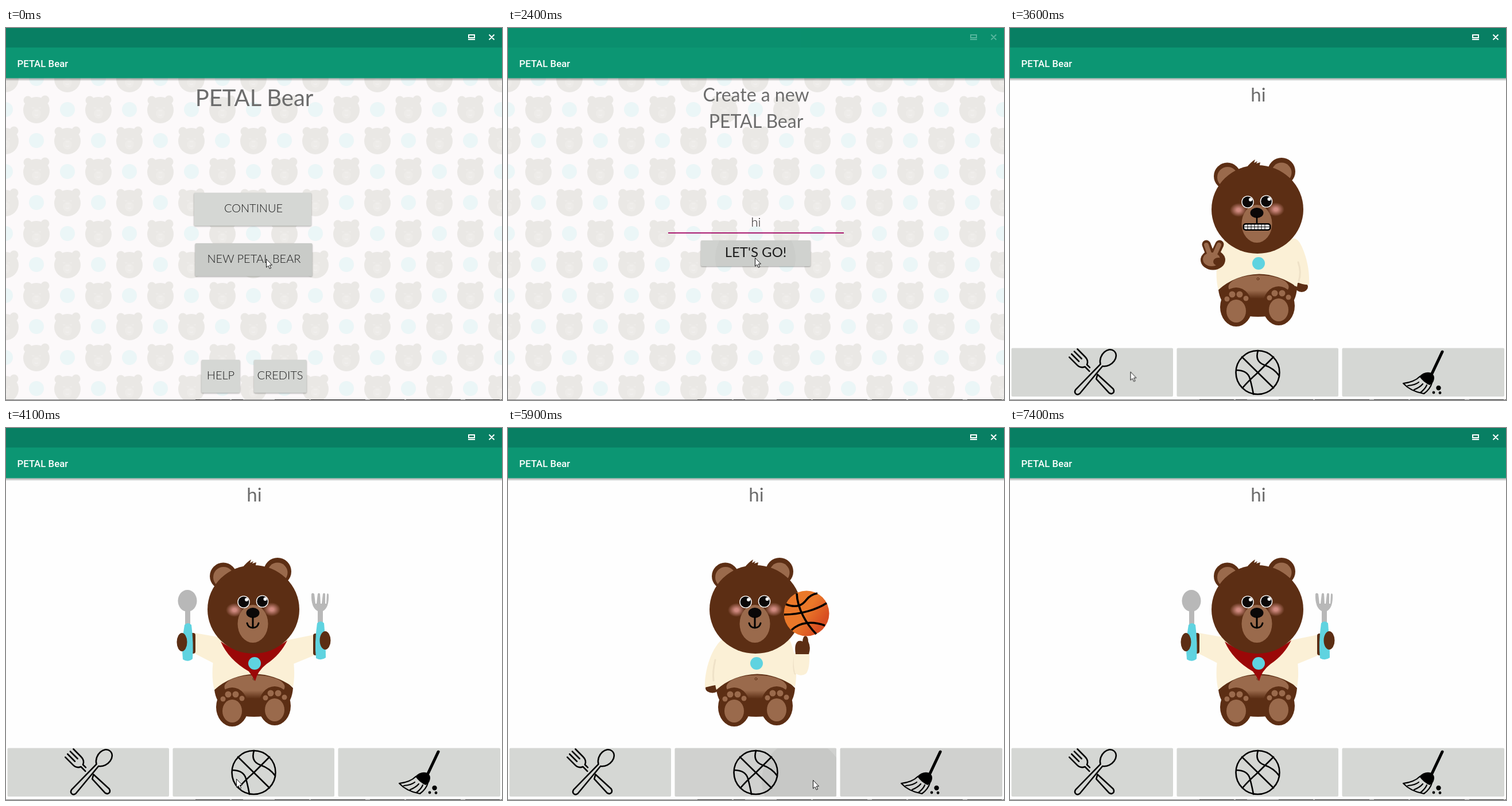
Recreate the animation shown at these times as an HTML page. Size 864 px wide and 648 px high, loop 7700 ms.

```html
<!DOCTYPE html>
<html lang="en">
<head>
<meta charset="utf-8">
<title>PETAL Bear</title>
<style>
html, body { margin: 0; width: 100%; height: 100%; overflow: hidden; background: #fff; }
svg { display: block; width: 864px; height: 648px; }
text { font-family: Lato, "Open Sans", sans-serif; text-anchor: middle; fill: #1c1c1c; }
.title { fill: #6c6c6c; }
.light { font-weight: 300; font-size: 22px; }
.label { font-size: 20px; font-weight: 300; }
.bar { font: 500 16.8px Roboto, sans-serif; text-anchor: start; fill: #fff; }
.btn { fill: #d5d7d4; filter: drop-shadow(0 1.5px 1px #0005); }
.flat { fill: #d5d7d4; }
.line { fill: none; stroke: #000; stroke-linecap: round; stroke-linejoin: round; }
.fur { fill: #5c2e14; }
.tan { fill: #9a6a4c; }
.cream { fill: #fbf0d6; }
.fold { fill: none; stroke: #efe2c8; stroke-width: 3; stroke-linecap: round; }
.mark { fill: #5fd3e0; }
.steel { fill: #b8b8b8; }

.a { animation: 7.7s step-end infinite; }

.cursor { animation-name: cursor; }
@keyframes cursor {
  0% { transform: translate(453px, 402px); }
  2.59% { transform: translate(441px, 401px); }
  5.19% { transform: translate(430px, 400px); }
  37.66% { transform: translate(422px, 408px); }
  38.96% { transform: translate(384px, 446px); }
  40.25% { transform: translate(318px, 508px); }
  41.55% { transform: translate(256px, 562px); }
  42.85% { transform: translate(222px, 590px); }
  44.15% { transform: translate(209.5px, 598.5px); }
  51.94% { transform: translate(330px, 605px); }
  53.24% { transform: translate(401px, 611px); }
  59.74% { transform: translate(414px, 614px); }
  62.33% { transform: translate(613px, 615px); }
  63.63% { transform: translate(646px, 616px); }
  64.93% { transform: translate(659px, 616px); }
  71.42% { transform: translate(585px, 615px); }
  72.72% { transform: translate(531px, 613px); }
  79.22% { transform: translate(478px, 610px); }
  80.51% { transform: translate(380px, 605px); }
  81.81% { transform: translate(281px, 600px); }
  83.11% { transform: translate(229px, 597px); }
  88.31% { transform: translate(219px, 545px); }
  89.61% { transform: translate(192px, 430px); }
  90.9% { transform: translate(156px, 284px); }
  92.2% { transform: translate(121px, 166px); }
  94.8%, to { transform: translate(-40px, 166px); }
}

.chrome { animation-name: chrome; }
@keyframes chrome {
  0% { opacity: 1; }
  7.79% { opacity: .3; }
  10.38% { opacity: .65; }
  11.68% { opacity: 1; }
  29.87% { opacity: .6; }
  31.16% { opacity: .3; }
  40.25% { opacity: .5; }
  41.55% { opacity: .7; }
  42.85% { opacity: .9; }
  44.15%, to { opacity: 1; }
}

.create { animation-name: create; }
@keyframes create {
  0% { opacity: 0; }
  9.09% { opacity: .4; transform: translateY(24px); }
  10.38% { opacity: .85; transform: translateY(6px); }
  11.68%, to { opacity: 1; transform: none; }
}

.play-screen { animation-name: play-screen; }
@keyframes play-screen {
  0% { opacity: 0; }
  37.66% { opacity: .12; transform: translateY(40px); }
  38.96% { opacity: .35; transform: translateY(24px); }
  40.25% { opacity: .6; transform: translateY(13px); }
  41.55% { opacity: .8; transform: translateY(6px); }
  42.85% { opacity: .95; transform: translateY(2px); }
  44.15%, to { opacity: 1; transform: none; }
}

.hint { animation-name: hint; }
@keyframes hint { 0% { opacity: 1; } 19.48%, to { opacity: 0; } }
.one { animation-name: one; }
@keyframes one { 0% { opacity: 0; } 19.48% { opacity: 1; } 22.07%, to { opacity: 0; } }
.two { animation-name: two; }
@keyframes two { 0% { opacity: 0; } 22.07%, to { opacity: 1; } }
.caret { animation-name: caret; }
@keyframes caret {
  0% { transform: none; }
  19.48% { transform: translateX(7px); }
  22.07% { transform: translateX(10px); opacity: 1; }
  29.87%, to { opacity: 0; }
}

.tap-new { animation-name: tap-new; }
@keyframes tap-new { 0% { opacity: 0; } 7.79%, to { opacity: .04; } }
.tap-go { animation-name: tap-go; }
@keyframes tap-go {
  0% { opacity: 0; transform: scale(.5); }
  29.87% { opacity: .03; transform: scale(.55); }
  31.16%, to { opacity: .03; transform: none; }
}
.held { animation-name: held; }
@keyframes held { 0% { opacity: 0; } 29.87%, to { opacity: .02; } }

.tap-eat { animation-name: tap-eat; }
@keyframes tap-eat {
  0% { opacity: 0; }
  49.35% { opacity: .04; }
  51.94% { opacity: 0; }
  84.41% { opacity: .04; transform: translate(20px, -2px); }
  88.31%, to { opacity: 0; }
}
.dim-ball { animation-name: dim-ball; }
@keyframes dim-ball {
  0% { opacity: 0; }
  55.84% { opacity: .03; }
  57.14% { opacity: .057; }
  71.42% { opacity: .02; }
  81.81%, to { opacity: 0; }
}
.tap-ball { animation-name: tap-ball; }
@keyframes tap-ball { 0% { opacity: 0; } 72.72% { opacity: .045; } 79.22%, to { opacity: 0; } }
.dim-broom { animation-name: dim-broom; }
@keyframes dim-broom { 0% { opacity: 0; } 62.33% { opacity: .02; } 81.81%, to { opacity: 0; } }

.peace { animation-name: peace; }
@keyframes peace { 0% { opacity: 1; } 49.35%, to { opacity: 0; } }
.smile { animation-name: smile; }
@keyframes smile { 0% { opacity: 0; } 49.35%, to { opacity: 1; } }
.eat { animation-name: eat; }
@keyframes eat {
  0% { opacity: 0; }
  49.35% { opacity: 1; }
  55.84% { opacity: 0; }
  84.41%, to { opacity: 1; }
}
.spin { animation-name: spin; }
@keyframes spin { 0% { opacity: 0; } 55.84% { opacity: 1; } 84.41%, to { opacity: 0; } }
.seams { transform-origin: 520px 323px; animation-name: seams; }
@keyframes seams {
  0% { transform: none; }
  67.53% { transform: rotate(90deg); }
  76.62%, to { transform: none; }
}
</style>
</head>
<body>
<svg viewBox="0 0 864 648">
  <defs>
    <g id="stamp">
      <g fill="#eae8e5"><circle cy="1" r="23"/><circle cx="-15" cy="-16" r="7.5"/><circle cx="15" cy="-17" r="7.5"/></g>
      <ellipse cy="7" rx="8" ry="9" fill="#edebe8"/>
      <path d="M-8-3h4M4-3h4M-3 2h6M-3 9Q0 12 3 9" fill="none" stroke="#f3f1f0" stroke-width="1.2"/>
    </g>
    <pattern id="paper" width="108" height="108" patternUnits="userSpaceOnUse" patternTransform="translate(26 115)">
      <rect width="108" height="108" fill="#fcf9fa"/>
      <use href="#stamp" x="27" y="27"/><use href="#stamp" x="81" y="81"/>
      <g fill="#ebf6f7"><circle cx="81" cy="27" r="13"/><circle cx="27" cy="81" r="13"/></g>
    </pattern>
    <linearGradient id="shade" x2="0" y2="1"><stop stop-opacity=".35"/><stop offset="1" stop-opacity="0"/></linearGradient>
    <radialGradient id="blush"><stop offset=".2" stop-color="#d08a80"/><stop offset="1" stop-color="#d08a80" stop-opacity="0"/></radialGradient>
    <linearGradient id="orange" x2="1" y2=".7"><stop offset=".55" stop-color="#ea7829"/><stop offset=".9" stop-color="#d84e22"/></linearGradient>
    <linearGradient id="tummy" x2="0" y2="1"><stop offset=".65" stop-color="#9a6a4c"/><stop offset="1" stop-color="#5c2e14"/></linearGradient>
    <clipPath id="new-box"><rect x="329" y="375" width="205" height="57"/></clipPath>
    <clipPath id="go-box"><rect x="336" y="370" width="191" height="46"/></clipPath>
    <clipPath id="eat-box"><rect x="3" y="558" width="281" height="84"/></clipPath>
    <clipPath id="ball-box"><rect x="291" y="558" width="281" height="84"/></clipPath>
    <g id="eye"><circle r="10.8" fill="#fff"/><circle r="9.4" fill="#0b0808"/><circle cx="5" cy="-4" r="3" fill="#fff"/></g>
    <g id="foot">
      <ellipse class="fur" rx="28" ry="34"/><ellipse class="tan" cx="0" cy="7" rx="17" ry="20"/>
      <g class="tan"><circle cx="-16" cy="-14" r="4.5"/><circle cx="-7" cy="-22" r="5.5"/><circle cx="6" cy="-22" r="5.5"/><circle cx="17" cy="-15" r="4.5"/></g>
    </g>
  </defs>

  <!-- Start menu -->
  <rect width="864" height="648" fill="url(#paper)"/>
  <text class="title" x="432.5" y="136" font-size="40">PETAL Bear</text>
  <rect class="btn" x="327.5" y="287" width="204.5" height="57.5" rx="2"/>
  <rect class="btn" x="329.5" y="375" width="204" height="57.5" rx="2" style="fill:#c9cbc8"/>
  <g clip-path="url(#new-box)"><circle class="a tap-new" cx="431" cy="402" r="75"/></g>
  <rect class="btn" x="340.5" y="578" width="67" height="57.5" rx="2"/>
  <rect class="btn" x="432" y="578" width="91.5" height="57.5" rx="2"/>
  <g class="label">
    <text x="431" y="320.500">CONTINUE</text><text x="432" y="408.500">NEW PETAL BEAR</text>
    <text x="374" y="612">HELP</text><text x="477.500" y="612">CREDITS</text>
  </g>

  <!-- Naming form -->
  <g class="a create">
    <rect y="60" width="864" height="588" fill="url(#paper)"/>
    <g font-size="32"><text class="title" x="432" y="128">Create a new</text><text class="title" x="432" y="174">PETAL Bear</text></g>
    <g class="light">
      <text class="a hint" x="432" y="346" style="fill:#999">Name your PETAL Bear</text>
      <text class="a one" x="431.5" y="346">h</text>
      <text class="a two" x="432" y="346">hi</text>
    </g>
    <rect x="279" y="356" width="306" height="2" fill="#a8186f"/>
    <rect class="a caret" x="430.5" y="323" width="2" height="32" fill="#a8186f"/>
    <rect class="btn" x="336" y="370" width="191" height="45" rx="2"/>
    <g clip-path="url(#go-box)">
      <rect class="a held" x="336" y="370" width="191" height="46"/>
      <g transform="translate(431 401)"><circle class="a tap-go" r="70"/></g>
    </g>
    <text x="431.5" y="399" font-size="24">LET'S GO!</text>
  </g>

  <!-- Bear -->
  <g class="a play-screen">
    <rect y="40" width="864" height="608" fill="#fefefe"/>
    <text class="title" x="432.5" y="128" font-size="33">hi</text>

    <g class="a peace">
      <ellipse class="fur" cx="508" cy="451" rx="11" ry="9"/>
      <path class="cream" d="M488 368Q500 362 508 380C518 402 522 425 521 447Q510 448 499 442Z"/>
    </g>
    <g class="a spin">
      <ellipse class="fur" cx="356" cy="453" rx="12" ry="8.5"/>
      <path class="cream" d="M376 366C355 380 342 422 343 452Q354 449 366 447Z"/>
    </g>
    <g class="a eat cream">
      <path d="M386 367L329 357V393L366 412Z"/><path d="M478 372L537 360V396L498 412Z"/>
    </g>
    <path class="fur" d="M363 456Q396 424 432 426Q472 424 500 453C498 482 480 503 432 503C385 503 366 482 363 456Z"/>
    <path class="cream" d="M374 368H490C501 390 505 425 500 451Q468 429 434 428.500Q392 430 363 456C357 435 358 390 374 368Z"/>
    <ellipse cx="433" cy="451" rx="52.500" ry="20.500" fill="url(#tummy)"/>
    <circle class="line" cx="432" cy="437" r="2" style="stroke:#5c2e14"/>
    <use href="#foot" x="394" y="486"/><use href="#foot" x="468" y="484"/>
    <path class="a eat" d="M374 372Q432 412 490 370Q478 395 454 411Q438 423 434 441Q430 433 423 424Q388 404 374 372Z" fill="#9b0808"/>
    <circle class="mark" cx="433" cy="410" r="11"/>

    <g class="fur"><circle cx="378.5" cy="258" r="23.5"/><circle cx="473" cy="250" r="24"/></g>
    <g class="tan"><circle cx="379" cy="260" r="18"/><circle cx="473" cy="252" r="17.5"/></g>
    <path class="fur" d="M412 243Q419 234 427 229L425 235L431 232L429 236L436 234L434 243Z"/>
    <ellipse class="fur" cx="431" cy="316" rx="80" ry="77"/>
    <g fill="url(#blush)"><ellipse cx="398" cy="317" rx="15" ry="12"/><ellipse cx="463" cy="316" rx="15" ry="12"/></g>
    <ellipse class="tan" cx="430" cy="341" rx="26.5" ry="33"/>
    <use href="#eye" x="414" y="303"/><use href="#eye" x="446.5" y="302"/>
    <ellipse cx="430" cy="322" rx="11.5" ry="9" fill="#0b0808"/>
    <path class="a line smile" d="M430 330V347M420 340Q422 348 430 348Q438 348 440 340" stroke-width="3"/>

    <g class="a peace">
      <path class="line" d="M430 330V341" stroke-width="2.5"/>
      <rect x="405.500" y="340" width="49" height="13" rx="5"/>
      <rect x="408" y="342.500" width="44" height="8" rx="3" fill="#fff"/>
      <path class="line" d="M408 346.500H452M414 342V351M420 342V351M426 342V351M432 342V351M438 342V351M444 342V351" stroke-width="1"/>
      <path class="fold" d="M502 408Q508 425 503 441"/>
      <g fill="none" stroke-linecap="round">
        <path d="M342 377L350 398M365 377L355 398" stroke="#5c2e14" stroke-width="15"/>
        <ellipse class="fur" cx="353.500" cy="404" rx="21.500" ry="17.500"/>
        <path d="M342 378L349 398M364 378L355 398" stroke="#9a6a4c" stroke-width="8"/>
      </g>
      <ellipse class="tan" cx="351" cy="403" rx="15" ry="12"/>
      <ellipse class="fur" cx="363" cy="407" rx="9" ry="7"/>
    </g>

    <g class="a spin">
      <path class="fold" d="M361 404Q356 425 358 440M499 400Q496 418 500 428"/>
      <path class="cream" d="M499 392H525Q526 420 519 428Q510 434 500 427Q496 410 499 392Z"/>
      <path class="fur" d="M501 394Q498 375 506 371Q511 370 513 372Q514 362 518 362Q523 363 523 372Q528 382 524 394Z"/>
      <circle cx="520" cy="323" r="39.500" fill="url(#orange)"/>
      <path class="a line seams" d="M503 288C504 315 520 342 537 359M481 325C510 325 538 316 555 305M484 307C505 315 514 307 520 299Q527 290 539 288M494 352C508 338 530 336 552 344" stroke-width="3.6" style="stroke-linecap:butt"/>
    </g>

    <g class="a eat">
      <rect class="fur" x="319" y="357" width="11" height="36" rx="4"/>
      <rect class="fur" x="535" y="358" width="11" height="38" rx="4"/>
      <g class="steel">
        <ellipse cx="316" cy="301" rx="16.5" ry="19"/><rect x="312" y="317" width="9" height="28"/>
        <path d="M532 289Q534 286 537 289L539 306H541L543 289Q545 286 547 289L548 306H550L552 289Q554 286 556 289V306H558L559 289Q561 287 562 290Q563 313 552 319V342H543V319Q531 313 532 289Z"/>
      </g>
      <path class="mark" d="M311 343Q317 337 323 343Q327 375 325 402Q317 409 308 403Q305 375 311 343Z"/>
      <path class="mark" d="M542 340Q548 334 554 340Q557 375 557 400Q549 406 540 401Q537 375 542 340Z"/>
      <g class="fur"><ellipse cx="306.500" cy="373" rx="9" ry="16"/><ellipse cx="556" cy="370" rx="9.500" ry="16"/></g>
    </g>

    <g class="flat">
      <rect x="2.500" y="557.500" width="281.500" height="84.500" rx="2"/>
      <rect x="290.500" y="557.500" width="281.500" height="84.500" rx="2"/>
      <rect x="578.500" y="557.500" width="282.500" height="84.500" rx="2"/>
    </g>
    <g clip-path="url(#eat-box)"><circle class="a tap-eat" cx="209" cy="599" r="95"/></g>
    <rect class="a dim-ball" x="290.500" y="557.500" width="281.500" height="84.500"/>
    <g clip-path="url(#ball-box)"><circle class="a tap-ball" cx="513" cy="614" r="71"/></g>
    <rect class="a dim-broom" x="578.500" y="557.500" width="282.500" height="84.500"/>

    <g class="line" stroke-width="2.6">
      <g transform="translate(148 600) rotate(42)">
        <path d="M-2.500-17C-17-27-13-50 0-50S17-27 2.500-17L5 45Q4 50 0 50T-5 45Z"/>
      </g>
      <g transform="translate(145 601) rotate(-45)">
        <path d="M-2.500-7V-18Q-10-21-10-30V-49M-3.300-32V-50M3.300-32V-50M10-49V-30Q10-21 2.500-18V-11M-3.500 11L-5 44Q-4 49 0 49T5 44L3.500 7Z"/>
      </g>
      <circle cx="431.500" cy="600" r="38"/>
      <path d="M404 573L459 627M432 562Q426 581 443 587T469 606M459 573L432 600Q414 616 405 627M394 596Q414 596 418 611T424 638"/>
    </g>
    <path class="line" d="M753 564L735 602" stroke-width="5"/>
    <path d="M713 607Q723 597 734 601Q742 606 737 617L731 622Q721 618 713 607Z"/>
    <path class="line" d="M714 607Q704 617 685 619Q698 633 721 637Q732 629 735 618M693 623Q706 622 712 617M704 630Q714 626 719 620M715 635Q723 629 726 622" stroke-width="2.200"/>
    <circle cx="746.500" cy="627" r="4.200"/><circle cx="738" cy="635" r="2.400"/><circle cx="749" cy="635.500" r="2.400"/>
  </g>

  <!-- Window frame -->
  <rect y="87.500" width="864" height="5" fill="url(#shade)"/>
  <rect width="864" height="87.500" fill="#0c9673"/>
  <g class="a chrome">
    <rect width="864" height="34" fill="#087f63"/>
    <path d="M806 12h10v5h-10zM805 20h12M841.500 11.500l9 9m0-9l-9 9" fill="none" stroke="#fff" stroke-width="2"/>
  </g>
  <text class="bar" x="19.500" y="67.500">PETAL Bear</text>
  <path d="M0 647.500H864" stroke="#858585"/>
  <path d="M330 647.500H413M468 647.500H864" stroke="#222" stroke-dasharray="60 3 95 8"/>
  <path class="a cursor" d="M.5.500V15L3.800 12L6.200 17.200L8.600 16.200L6.200 11H10.500Z" fill="#fff" stroke="#111"/>
</svg>
</body>
</html>
```
